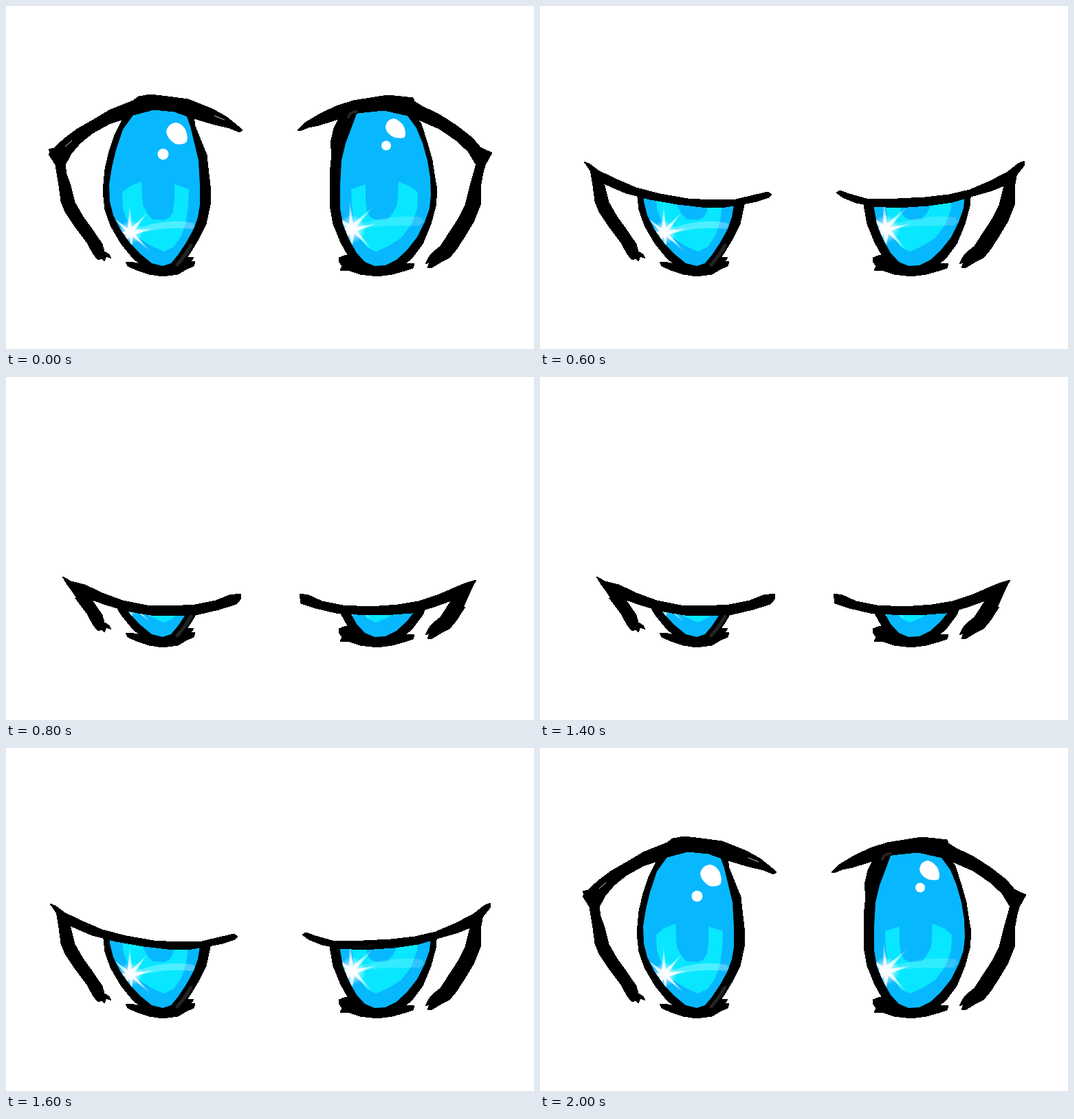
An HTML page for the animation above (2.6 s loop, 768x500 px).

```html
<!DOCTYPE html>
<html lang="en">
<head>
<meta charset="utf-8">
<title>Blinking eyes</title>
<style>
html, body { margin: 0; width: 100%; height: 100%; overflow: hidden; background: #fff; }
svg { display: block; width: 768px; height: 500px; }
.ink { fill: #000; stroke: #000; stroke-width: 1; stroke-linejoin: round; }
.cover { fill: #fff; }
.iris { fill: #08b8ff; }
.glow { fill: #08e7ff; }
.sheen { fill: #fff; }
.smudge { fill: none; stroke: #242424; stroke-linecap: round; }
.scratch { fill: none; stroke: #fff; stroke-width: .8; }
.pose { opacity: 0; animation: 2600ms step-end infinite; }
#open { animation-name: open; }
#low { animation-name: low; }
#half { animation-name: half; }
#slit { animation-name: slit; }
#shut { animation-name: shut; }
@keyframes open { 0% { opacity: 1 } 15.3846% { opacity: 0 } 76.9231%, 100% { opacity: 1 } }
@keyframes low { 0% { opacity: 0 } 15.3846% { opacity: 1 } 23.0769% { opacity: 0 } 69.2308% { opacity: 1 } 76.9231%, 100% { opacity: 0 } }
@keyframes half { 0% { opacity: 0 } 23.0769% { opacity: 1 } 30.7692% { opacity: 0 } 61.5385% { opacity: 1 } 69.2308%, 100% { opacity: 0 } }
@keyframes slit { 0% { opacity: 0 } 30.7692% { opacity: 1 } 38.4615% { opacity: 0 } 53.8462% { opacity: 1 } 61.5385%, 100% { opacity: 0 } }
@keyframes shut { 0% { opacity: 0 } 38.4615% { opacity: 1 } 53.8462%, 100% { opacity: 0 } }
</style>
</head>
<body>
<svg viewBox="0 0 768 500">
  <defs>
    <path id="irisL" d="M185 159L215 150 246 153 263 161 268 175 274 200 280 225 282 260 282 290 279 308 273 325 262 345 250 363 240 375 228 379 212 375 195 361 180 345 166 325 156 305 151 285 150 260 154 235 160 210 170 180Z"/>
    <path id="irisR" d="M510 157L530 152 553 150 584 160 597 178 606 200 613 225 617 250 618 275 616 295 609 315 598 337 583 356 568 370 552 378 536 379 522 373 510 360 499 340 490 318 486 295 486 260 488 225 494 200 503 176Z"/>
    <path id="glow" d="M169 272L180 263 197 256 198 275 199 290 206 303 213 311 230 312 238 308 243 300 245 283 245 260 266 267 265 290 262 315 255 335 244 351 230 358 212 350 193 338 178 318 170 295Z"/>
    <path id="lid" d="M98 351L103 350 120 355 145 366 175 373 205 378 232 379 255 374 280 366 300 361 320 354 334 350 337 352 336 357 320 367 295 380 270 394 250 401 225 401 190 396 155 386 125 372 105 360Z"/>
    <clipPath id="inL"><use href="#irisL"/></clipPath>
    <clipPath id="inR"><use href="#irisR"/></clipPath>
    <radialGradient id="ray" gradientUnits="userSpaceOnUse" cx="0" cy="0" r="42">
      <stop offset="0" stop-color="#fff"/>
      <stop offset=".4" stop-color="#fff" stop-opacity=".8"/>
      <stop offset="1" stop-color="#fff" stop-opacity=".1"/>
    </radialGradient>
    <radialGradient id="halo">
      <stop offset="0" stop-color="#fff"/>
      <stop offset=".35" stop-color="#fff" stop-opacity=".7"/>
      <stop offset="1" stop-color="#fff" stop-opacity="0"/>
    </radialGradient>
  </defs>
  <rect class="cover" width="768" height="500"/>

  <g class="ink" shape-rendering="crispEdges">
    <path d="M68 210L62 216 66 222 72 232 77 262 80 285 86 300 100 321 118 345 127 362 134 370 140 368 143 372 146 365 153 368 150 362 143 358 140 347 125 325 112 307 100 286 94 262 88 245 86 230Z"/>
    <path d="M700 212L707 214 702 222 697 232 694 243 690 265 690 290 680 315 668 335 655 355 645 367 635 372 620 381 613 381 616 374 610 376 615 366 622 358 632 350 645 330 658 310 668 290 675 262 684 230Z"/>
    <path d="M176 155L272 155 275 175 285 200 292 217 294 236 297 262 297 290 291 318 280 340 268 360 250 385 205 385 184 367 167 346 152 320 144 297 141 270 144 238 150 212 158 188 168 168Z"/>
    <path d="M504 150L590 152 604 172 613 200 620 225 623 245 627 268 625 292 618 318 606 347 590 368 570 385 515 385 500 368 487 345 476 318 471 290 471 245 474 215 472 200 477 178 487 158Z"/>
    <path d="M174 373L182 373 195 376 228 370 255 370 264 366 273 366 269 373 275 372 273 379 262 384 250 391 228 394 208 391 190 385 177 379Z"/>
    <path d="M484 367L495 363 505 368 540 372 565 374 594 376 592 382 580 386 562 391 540 394 515 391 500 386 486 385 489 379 485 374Z"/>
  </g>

  <g class="iris">
    <use href="#irisL"/>
    <use href="#irisR"/>
  </g>
  <g class="glow">
    <use href="#glow"/>
    <use href="#glow" transform="matrix(-1 0 0 1 768 0)"/>
  </g>
  <g class="cover">
    <path d="M233 183Q235 172 246 170 255 170 261 180 266 193 262 199 256 203 246 201 234 193 233 183Z"/>
    <path d="M552 176Q554 165 564 164 573 166 579 176 583 188 579 192 567 194 560 189 552 183 552 176Z"/>
    <circle cx="228.500" cy="216" r="8"/>
    <circle cx="553" cy="203.500" r="7"/>
  </g>

  <g clip-path="url(#inL)">
    <path class="sheen" opacity=".28" d="M188 326C215 315 245 311 272 316L276 321 270 325C245 322 215 325 190 333Z"/>
    <g transform="translate(181 330)">
      <circle r="18" fill="url(#halo)"/>
      <path fill="url(#ray)" d="M-1-41L2-7 25-29 6-3 34-6 7 3 29 28 3 6 2 34-1 7-17 21-6 3-26 3-7-2-26-22-4-6Z"/>
    </g>
  </g>
  <g clip-path="url(#inR)">
    <path class="sheen" opacity=".17" d="M508 320C540 309 575 304 604 308L608 313 602 320C575 321 540 318 511 327Z"/>
    <g transform="translate(503 325)">
      <circle r="21" fill="url(#halo)"/>
      <path fill="url(#ray)" d="M-3-43L2-8 34-35 6-3 37-8 8 3 31 32 4 7-1 34-3 8-18 22-7 3-26 3-8-2-22-18-4-7Z"/>
    </g>
  </g>
  <path class="smudge" stroke-width="5" d="M269 349Q260 365 249 377"/>

  <g id="open" class="pose">
    <g class="ink" shape-rendering="crispEdges">
      <path d="M62 209L70 207 85 193 104 179 125 167 150 152 185 138 193 132 210 129 235 132 265 136 285 144 300 150 320 161 335 173 344 181 340 184 325 178 300 172 270 163 245 154 215 151 185 159 168 166 150 172 125 186 108 200 95 215 86 232 72 232Z"/>
      <path d="M424 181L435 170 455 158 480 146 505 138 530 134 555 130 575 132 592 134 594 139 605 146 630 158 655 174 678 192 690 206 698 210 707 214 697 232 684 232 672 212 655 196 630 179 598 165 585 160 550 152 512 156 500 160 480 166 455 174 440 177 428 182Z"/>
    </g>
    <path class="scratch" d="M303 160L318 166M86 205L96 196"/>
    <path class="smudge" stroke-width="4" d="M498 162Q500 154 510 154"/>
  </g>

  <g id="low" class="pose">
    <path class="cover" d="M0 0H768V235H697L650 220 600 215 520 210 470 215 436 240 330 240 300 222 200 206 130 213 75 235 0 235Z"/>
    <g class="ink" shape-rendering="crispEdges">
      <path d="M69 236L80 226 105 212 130 206 155 203 190 197 225 198 255 203 285 209 300 214 320 227 335 238 330 245 318 241 298 231 282 235 262 227 235 223 205 217 175 212 155 216 125 220 100 228 88 235 76 240Z"/>
      <path d="M430 243L436 232 455 218 475 210 500 205 520 201 550 202 580 205 610 210 640 213 670 216 690 224 699 235 693 240 680 232 655 227 635 228 612 226 600 224 575 219 530 218 490 219 470 227 452 234 437 246Z"/>
    </g>
  </g>

  <g id="half" class="pose">
    <path class="cover" d="M0 0H768V230L700 231 680 252 640 266 600 281 520 288 470 284 434 272 334 275 300 284 240 288 170 278 110 262 68 233 0 230Z"/>
    <g class="ink" shape-rendering="crispEdges">
      <path d="M64 227L72 230 85 240 110 252 140 265 175 274 215 281 250 283 285 282 310 276 332 271 337 275 333 279 315 285 295 289 270 293 235 293 200 289 160 282 125 273 95 260 76 244Z"/>
      <path d="M431 272L436 269 450 274 475 281 520 281 560 279 595 275 625 268 655 255 680 242 695 230 704 226 704 233 692 248 678 261 655 270 630 277 600 286 565 291 520 294 485 292 460 287 440 279Z"/>
    </g>
  </g>

  <g id="slit" class="pose">
    <path class="cover" d="M0 0H768V335H666L683 297 650 312 600 334 530 341 470 338 430 323 340 322 300 335 240 341 170 333 110 310 82 291 102 322 0 322Z"/>
    <g class="ink" shape-rendering="crispEdges">
      <path d="M82 291L95 298 115 303 140 315 170 326 205 333 240 334 275 332 305 326 325 318 341 316 342 323 335 331 310 339 280 346 245 348 210 347 175 341 145 332 120 323 112 328 100 317 90 304Z"/>
      <path d="M427 316L440 318 460 327 490 333 530 335 570 332 600 327 630 317 655 306 670 300 684 296 676 310 668 328 655 325 648 326 620 336 590 344 550 347 510 346 480 344 450 337 429 330Z"/>
    </g>
  </g>

  <g id="shut" class="pose">
    <rect class="cover" width="768" height="500"/>
    <g class="ink" shape-rendering="crispEdges">
      <use href="#lid"/>
      <use href="#lid" transform="matrix(-1 0 0 1 768 0)"/>
    </g>
  </g>
</svg>
</body>
</html>
```
